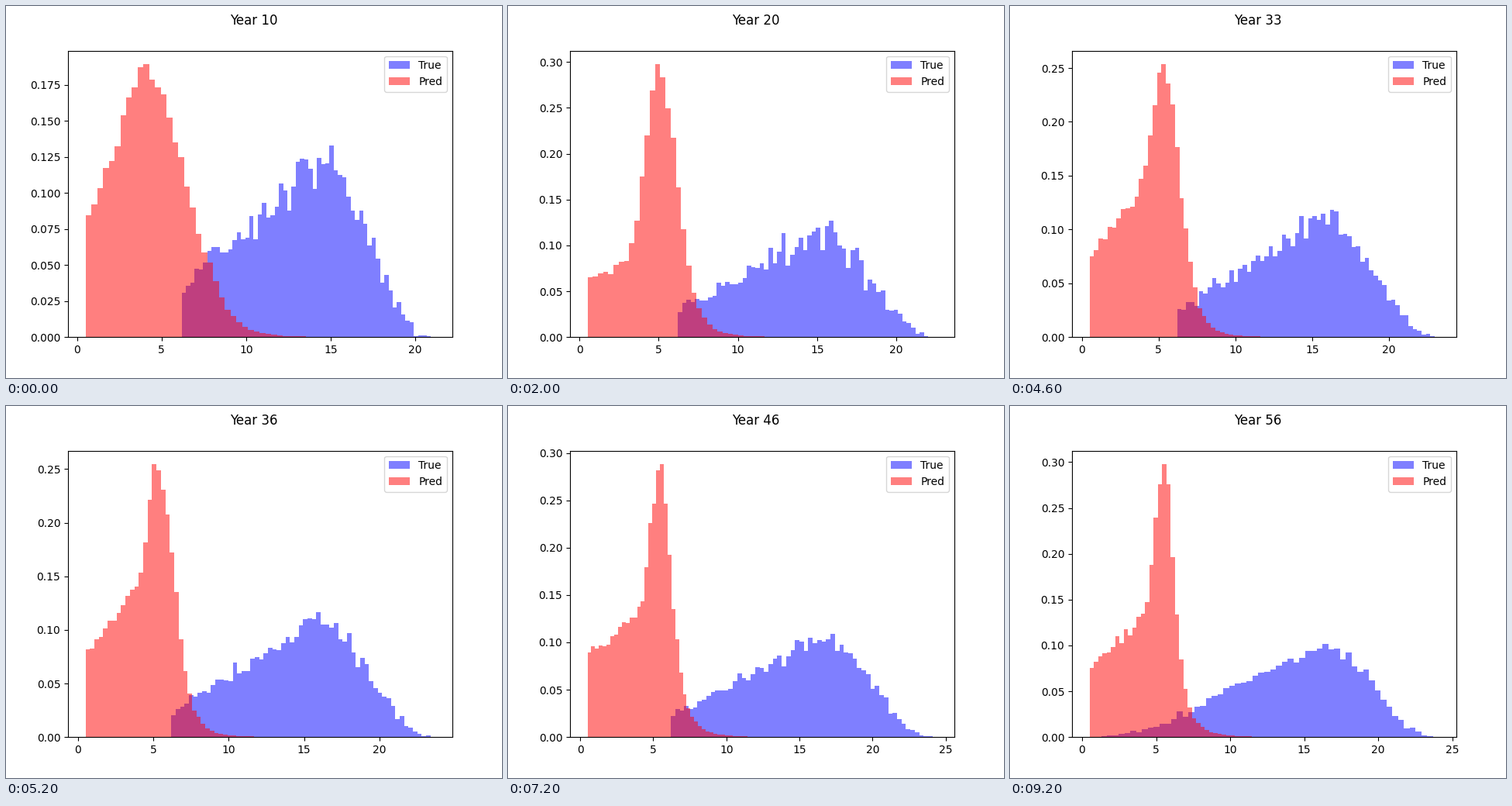
Recreate the animation shown at these times as a matplotlib script. Size 640 by 480 pixels, loop 9.4 s.

```python
import numpy as np
import matplotlib.pyplot as plt
from matplotlib.animation import FuncAnimation

FIRST, LAST, STEP_MS = 10, 56, 200
BINS = 60
START = 0.5          # smallest predicted value
BODY = 6.2           # smallest true value in the early years
TAIL_YEAR = 50       # from here on small true values appear

# Key years: largest true and predicted value, highest bar, shoulder height and slope
KEYS = np.array([
    [10, 21.16, 21.10, 0.1893, 0.085, 0.015],
    [20, 22.57, 20.20, 0.2975, 0.060, 0.009],
    [27, 23.33, 20.00, 0.3029, 0.062, 0.014],
    [33, 23.24, 18.05, 0.2535, 0.075, 0.018],
    [40, 24.26, 18.30, 0.2557, 0.075, 0.018],
    [46, 24.40, 16.15, 0.2880, 0.084, 0.013],
    [56, 24.10, 17.80, 0.2977, 0.075, 0.016],
])


def mix(a, b, t):
    return a + (b - a) * t


def centers(edges):
    return (edges[:-1] + edges[1:]) / 2


def pred_bars(year, end, top, base, slope, rng):
    """A sloping shoulder with a soft cutoff, a bell-shaped peak and a thin tail."""
    edges = np.linspace(START, end, BINS + 1)
    x = centers(edges)
    t = (year - FIRST) / (LAST - FIRST)
    early = np.exp((FIRST - year) / 4)
    cutoff = 7.0 - 0.45 * t - 0.3 * early
    softness = 0.42 + 0.28 * early
    mode = 5.1 + 0.4 * t - 1.4 * early
    width = 0.5 + 0.75 * np.exp((FIRST - year) / 12)

    def shoulder(v):
        return (base + slope * (v - START)) / (1 + np.exp((v - cutoff) / softness))

    peak = (top - shoulder(mode)) * np.exp(-((x - mode) / width) ** 2 / 2)
    tail = (0.008 + 0.016 * early) * np.exp(-np.abs(x - 8) / 1.3)
    h = shoulder(x) + peak + tail
    h *= 1 + 0.03 * rng.standard_normal(BINS)
    return edges, h * top / h.max()


def true_bars(year, end, rng):
    """A straight rise to the mode and a cosine fall, with sampling noise."""
    late = year >= TAIL_YEAR
    edges = np.linspace(START if late else BODY, end, BINS + 1)
    x = centers(edges)
    t = (year - FIRST) / (LAST - FIRST)
    edge = 0.022 + 0.014 * np.exp((FIRST - year) / 10)
    mode, peak = mix(0.53, 0.56, t), mix(0.123, 0.098, t)

    u = (x - BODY) / (end - BODY)
    rise = mix(edge, peak, u / mode)
    fall = peak * np.cos(np.pi / 2 * np.clip((u - mode) / (1 - mode), 0, 1)) ** 2.2
    h = np.where(u < mode, rise, fall)
    if late:
        grown = mix(0.3, 1, (year - TAIL_YEAR) / (LAST - TAIL_YEAR))
        h = np.where(x < BODY, 0.019 * grown * ((x - START) / (BODY - START)) ** 2, h)
    spread = mix(0.030, 0.014, t) * np.sqrt(h)
    return edges, np.maximum(h + spread * rng.standard_normal(BINS), 0)


def place(bars, edges, heights):
    for bar, left, right, h in zip(bars, edges[:-1], edges[1:], heights):
        bar.set_bounds(left, 0, right - left, h)


fig, ax = plt.subplots(figsize=(6.4, 4.8), dpi=100)
title = fig.suptitle("")
slots = np.arange(BINS)
true_set = ax.bar(slots, slots, color="blue", alpha=0.5, label="True")
pred_set = ax.bar(slots, slots, color="red", alpha=0.5, label="Pred")
ax.legend(loc="upper right")


def draw(i):
    year = FIRST + i
    rng = np.random.default_rng(year)
    true_end, pred_end, top, base, slope = (
        np.interp(year, KEYS[:, 0], column) for column in KEYS.T[1:])
    place(true_set, *true_bars(year, true_end, rng))
    place(pred_set, *pred_bars(year, pred_end, top, base, slope, rng))
    margin = 0.05 * (true_end - START)
    ax.set_xlim(START - margin, true_end + margin)
    ax.set_ylim(0, 1.05 * top)
    title.set_text(f"Year {year}")
    return [title, *true_set, *pred_set]


anim = FuncAnimation(fig, draw, frames=LAST - FIRST + 1, interval=STEP_MS,
                     repeat=True, repeat_delay=0, blit=False)
plt.show()
```
